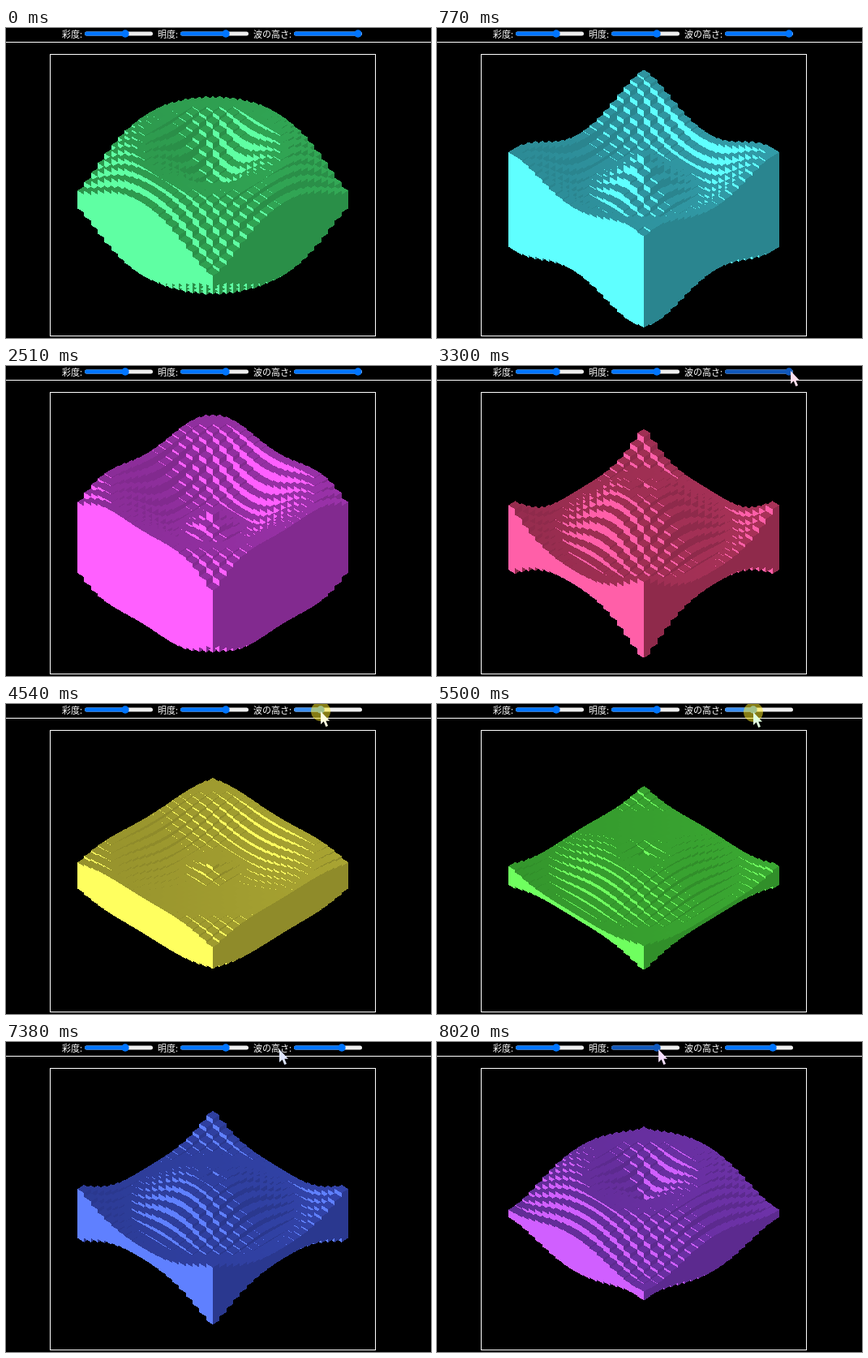
An HTML page with a canvas that plays this animation: 524 by 382 pixels, repeating every 8170 ms.

```html
<!DOCTYPE html>
<html lang="ja">
<head>
<meta charset="utf-8">
<title>Wave</title>
<style>
  html, body { margin: 0; width: 524px; height: 382px; overflow: hidden; background: #000; }
  canvas, svg { position: absolute; left: 0; top: 0; display: block; }
  text { font: 500 11px "Noto Sans CJK JP", "Noto Sans CJK", sans-serif; fill: #fff; }
</style>
</head>
<body>
<canvas id="stage" width="524" height="382"></canvas>
<svg width="524" height="382">
  <path d="M0 17.5H524" stroke="#fff"/>
  <rect x="54.5" y="32.5" width="401" height="347" fill="none" stroke="#fff"/>
  <text x="69" y="12">彩度:</text>
  <text x="187" y="12">明度:</text>
  <text x="305" y="12">波の高さ:</text>
  <g id="sliders"></g>
  <g id="pointer">
    <circle id="press" r="12" fill="#ffee28" fill-opacity=".52"/>
    <path id="arrow" d="M0 0V16L3.7 12.6L6.3 19L9 17.9L6.4 11.7H11Z"/>
  </g>
</svg>
<script>
const W = 524, H = 382, LOOP = 8170, STEP = LOOP / 52;
const N = 20, CX = 255.02, CY = 211.3, HW = 8.35, HH = 5.085;
const IDLE = '#0075ff', HOVER = '#1058bc', ACTIVE = '#3b8ff2';

const $ = id => document.getElementById(id);
const ctx = $('stage').getContext('2d');
const image = ctx.createImageData(W, H);
const pixels = new Uint32Array(image.data.buffer);
const clamp = v => Math.max(0, Math.min(1, v));

// Piecewise linear track of [time, ...values]
function track(keys, t) {
  if (t <= keys[0][0]) return keys[0].slice(1);
  for (let i = 1; i < keys.length; i++) {
    const a = keys[i - 1], b = keys[i];
    if (t < b[0]) {
      const f = (t - a[0]) / (b[0] - a[0]);
      return a.slice(1).map((v, n) => v + (b[n + 1] - v) * f);
    }
  }
  return keys[keys.length - 1].slice(1);
}

const pointerPath = [
  [2820, 487, 0], [3300, 436, 6], [3450, 434, 8], [4300, 388, 9], [4540, 388, 9],
  [5500, 390, 10], [5700, 392, 9], [6300, 414, 8], [6760, 415, 8], [7070, 412, 8],
  [7640, 276, 10], [8020, 273, 9]
];
const thumbPath = [
  [3450, 434], [4300, 388], [4540, 388], [5500, 390], [5700, 392], [6300, 414]
];

function shade(hue, max, min) {
  return [5, 3, 1].map(n => {
    const k = (n + hue / 60) % 6;
    const v = max - (max - min) * clamp(Math.min(k, 4 - k));
    return Math.min(255, Math.round(v));
  });
}
const pack = ([r, g, b]) => (255 << 24 | b << 16 | g << 8 | r) >>> 0;

function fillColumn(x, from, to, color) {
  for (let y = Math.max(0, from), p = y * W + x; y < Math.min(H, to); y++, p += W) pixels[p] = color;
}

function drawBox(cx, cy, h, top, left, right) {
  for (let x = Math.ceil(cx - HW - .5); x + .5 < cx + HW; x++) {
    const dx = x + .5 - cx, edge = HH * (1 - Math.abs(dx) / HW);
    const y0 = Math.round(cy - h / 2 - edge);
    const y1 = Math.round(cy - h / 2 + edge);
    const y2 = Math.round(cy + h / 2 + edge);
    fillColumn(x, y0, y1, top);
    fillColumn(x, y1, y2, dx < 0 ? left : right);
  }
}

function drawWave(t, scale, hue, bright) {
  // Tops catch a little more light towards the right
  const tops = Array.from({ length: 2 * N - 1 }, (_, n) => {
    const light = 1 + .003 * (n - N + 1);
    return pack(shade(hue, 159 * light, 47 * light));
  });
  const right = pack(shade(hue, 143, 42));
  const left = pack(bright);
  const angle = 2.82 - .00306 * t;
  pixels.fill(0xff000000);
  for (let i = 0; i < N; i++) {
    for (let j = 0; j < N; j++) {
      const d = Math.hypot(i - 9, j - 9);
      const phase = angle - .42 * (Math.SQRT2 * 10 - d);
      const h = scale * (64.8 + 52.2 * Math.cos(phase));
      drawBox(CX + (i - j) * HW, CY + (i + j - N + 1) * HH, h, tops[i - j + N - 1], left, right);
    }
  }
  ctx.putImageData(image, 0, 0);
}

function svg(tag, attrs) {
  const el = document.createElementNS('http://www.w3.org/2000/svg', tag);
  for (const k in attrs) el.setAttribute(k, attrs[k]);
  return $('sliders').appendChild(el);
}

function makeSlider(x, value) {
  const bar = { x, y: 4.5, height: 5, rx: 2.5 };
  svg('rect', { ...bar, width: 84, fill: '#efefef' });
  const fill = svg('rect', bar), thumb = svg('circle', { cy: 7, r: 4.7 });
  const set = (v, color) => {
    fill.setAttribute('width', v - x);
    thumb.setAttribute('cx', v);
    fill.setAttribute('fill', color);
    thumb.setAttribute('fill', color);
  };
  set(value, IDLE);
  return set;
}

makeSlider(97, 147);
const setLightness = makeSlider(215, 271);
const setHeight = makeSlider(355, 434);

function drawPointer(t, bright) {
  const [x, y] = track(pointerPath, t);
  const tint = bright.map(v => Math.round(255 - (255 - v) * .2));
  $('pointer').setAttribute('visibility', t < 2800 ? 'hidden' : 'visible');
  $('pointer').setAttribute('transform', `translate(${x} ${y})`);
  $('press').setAttribute('fill-opacity', t > 3400 && t < 6900 ? .52 : 0);
  $('arrow').setAttribute('fill', `rgb(${tint})`);
}

function render(t) {
  const [thumb] = track(thumbPath, t);
  const hue = (138 + .0614 * t) % 360;
  const bright = shade(hue, 322, 95);
  drawWave(t, (thumb - 360) / 74, hue, bright);
  setHeight(thumb, t < 3120 || t > 7200 ? IDLE : t > 3400 && t < 6900 ? ACTIVE : HOVER);
  setLightness(271, t > 7580 ? HOVER : IDLE);
  drawPointer(t, bright);
}

let shown = -1;
function tick() {
  const t = performance.now() % LOOP;
  const step = Math.min(51, Math.floor((t + 20) / STEP));
  if (step !== shown) render((shown = step) * STEP);
  requestAnimationFrame(tick);
}
tick();
</script>
</body>
</html>
```
